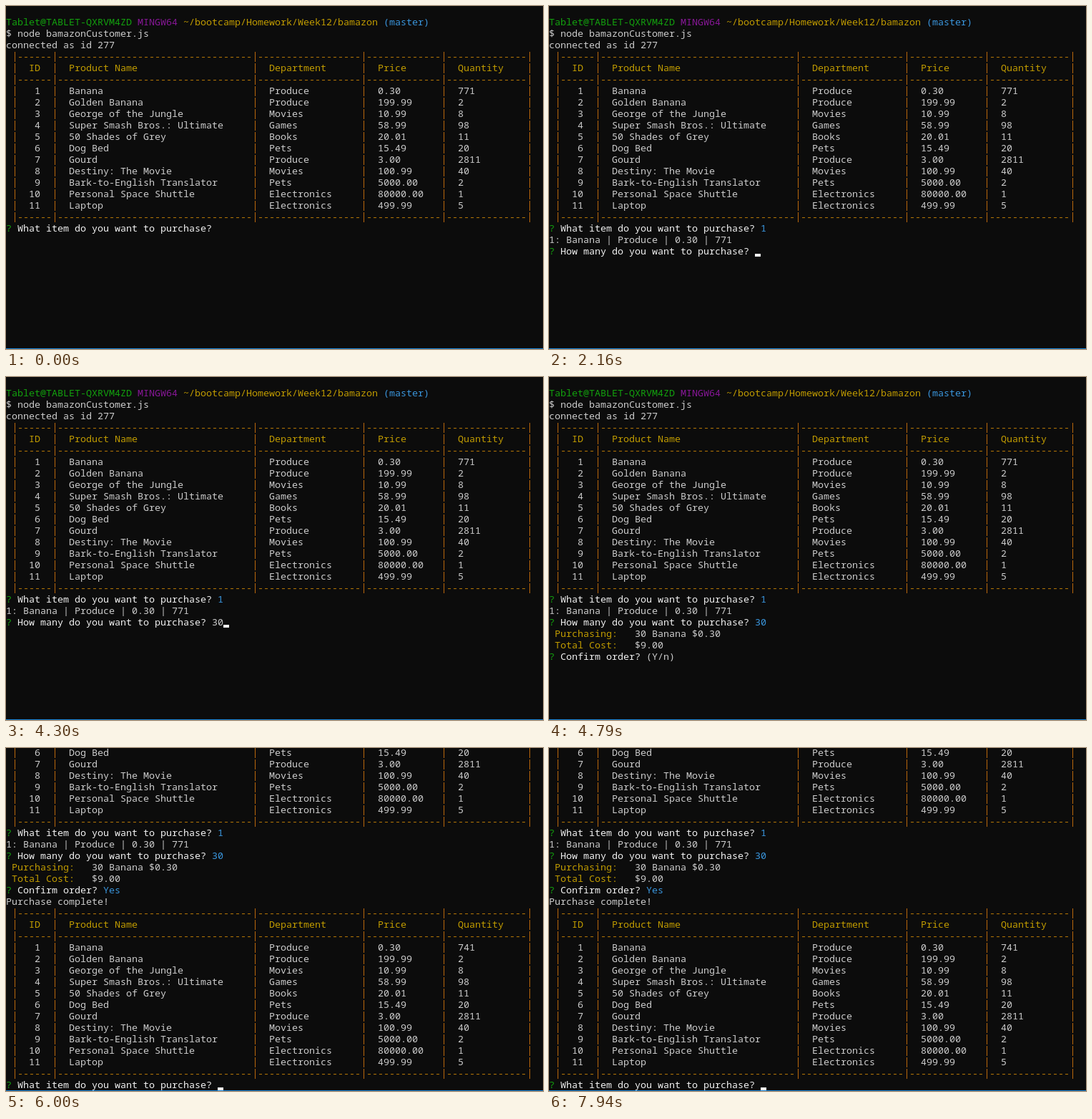
An HTML page with a canvas for the animation above (8090 ms loop, 751 by 479 pixels).

```html
<!DOCTYPE html>
<html lang="en">
<head>
<meta charset="utf-8">
<title>Terminal shop</title>
<style>
  html, body { margin: 0; width: 100%; height: 100%; overflow: hidden; background: #0c0c0c; }
  canvas { display: block; }
</style>
</head>
<body>
<canvas id="screen" width="751" height="479"></canvas>
<script>
const ctx = document.getElementById('screen').getContext('2d');
const LOOP = 8090, CELL = 8, LINE = 16, TOP = 14;
const GREY = '#cccccc', WHITE = '#f2f2f2', GREEN = '#13a10e', YELLOW = '#c19c00',
      PURPLE = '#881798', CYAN = '#3a96dd', DASH = '#b87a08', BAR = '#b9680c';

const BARS = [1, 8, 43, 62, 76, 91];
const COLUMNS = [4, 11, 46, 65, 79];
const HEADINGS = ['ID', 'Product Name', 'Department', 'Price', 'Quantity'];
const PRODUCTS = [
  ['Banana', 'Produce', '0.30', '771'],
  ['Golden Banana', 'Produce', '199.99', '2'],
  ['George of the Jungle', 'Movies', '10.99', '8'],
  ['Super Smash Bros.: Ultimate', 'Games', '58.99', '98'],
  ['50 Shades of Grey', 'Books', '20.01', '11'],
  ['Dog Bed', 'Pets', '15.49', '20'],
  ['Gourd', 'Produce', '3.00', '2811'],
  ['Destiny: The Movie', 'Movies', '100.99', '40'],
  ['Bark-to-English Translator', 'Pets', '5000.00', '2'],
  ['Personal Space Shuttle', 'Electronics', '80000.00', '1'],
  ['Laptop', 'Electronics', '499.99', '5']
];

// Times at which the cursor blinks on and off
const BLINKS = [70, 580, 1090, 1620, 1720, 2680, 3220, 3700, 4150, 4790,
                5320, 5860, 5930, 6330, 6890, 7420, 7940];

// Cursor positions: [start time, column, row]
const CURSOR = [[0, 37, 18], [1720, 38, 18], [2160, 36, 20], [4150, 37, 20], [4220, 0, 20],
                [4300, 38, 20], [4610, 23, 23], [5930, 0, 25], [6000, 37, 40]];

const rowTop = row => TOP + row * LINE;

function put(col, row, text, color = GREY) {
  ctx.fillStyle = color;
  ctx.fillText(text, col * CELL, rowTop(row) + 13);
}

function putRun(row, ...parts) {
  let col = 0;
  for (const [text, color] of parts) {
    put(col, row, text, color);
    col += text.length;
  }
}

function ask(row, question, answer = '', color = CYAN) {
  putRun(row, ['? ', GREEN], [question + ' ', WHITE], [answer, color]);
}

function bars(row) {
  ctx.fillStyle = BAR;
  for (const col of BARS) ctx.fillRect(col * CELL + 4, rowTop(row) + 2, 1, 14);
}

function rule(row) {
  bars(row);
  BARS.slice(1).forEach((end, i) =>
    put(BARS[i] + 1, row, '-'.repeat(end - BARS[i] - 1), DASH));
}

function record(row, cells, color) {
  bars(row);
  cells.forEach((text, i) => put(COLUMNS[i], row, text, color));
}

function table(row, bananas) {
  rule(row);
  record(row + 1, HEADINGS, YELLOW);
  rule(row + 2);
  PRODUCTS.forEach((product, i) => {
    const cells = [String(i + 1).padStart(2), ...product];
    if (i === 0) cells[4] = bananas;
    record(row + 3 + i, cells);
  });
  rule(row + 3 + PRODUCTS.length);
}

function drawSession(t) {
  putRun(0, ['Tablet@TABLET-QXRVM4ZD ', GREEN], ['MINGW64 ', PURPLE],
    ['~/bootcamp/Homework/Week12/bamazon ', YELLOW], ['(master)', CYAN]);
  put(0, 1, '$ node bamazonCustomer.js');
  put(0, 2, 'connected as id 277');
  table(3, '771');

  ask(18, 'What item do you want to purchase?', t >= 1720 ? '1' : '', t >= 2160 ? CYAN : GREY);
  if (t < 2160) return;

  put(0, 19, '1: Banana | Produce | 0.30 | 771');
  const amount = t >= 4300 ? '30' : t >= 4150 ? '3' : '';
  ask(20, 'How many do you want to purchase?', amount, t >= 4610 ? CYAN : GREY);
  if (t < 4610) return;

  put(1, 21, 'Purchasing:', YELLOW);
  put(15, 21, '30 Banana $0.30');
  put(1, 22, 'Total Cost:', YELLOW);
  put(15, 22, '$9.00');
  if (t < 5930) return ask(23, 'Confirm order?', '(Y/n)', GREY);

  ask(23, 'Confirm order?', 'Yes');
  put(0, 24, 'Purchase complete!');
  if (t < 6000) return;

  table(25, '741');
  ask(40, 'What item do you want to purchase?');
}

function drawCursor(t) {
  if (BLINKS.filter(time => time <= t).length % 2 === 0) return;
  const [, col, row] = CURSOR.filter(([start]) => start <= t).pop();
  ctx.fillStyle = WHITE;
  ctx.fillRect(col * CELL, rowTop(row) + 12, CELL, 4);
}

function draw(t) {
  ctx.fillStyle = '#0c0c0c';
  ctx.fillRect(0, 0, 751, 479);
  ctx.font = '13.3333px "Noto Sans Mono", monospace';
  ctx.save();
  if (t >= 6000) ctx.translate(0, -12 * LINE);
  drawSession(t);
  drawCursor(t);
  ctx.restore();
  ctx.fillStyle = '#1883d7';
  ctx.fillRect(0, 478, 751, 1);
}

const start = performance.now();
function tick() {
  draw((performance.now() - start) % LOOP);
  requestAnimationFrame(tick);
}
tick();
</script>
</body>
</html>
```
